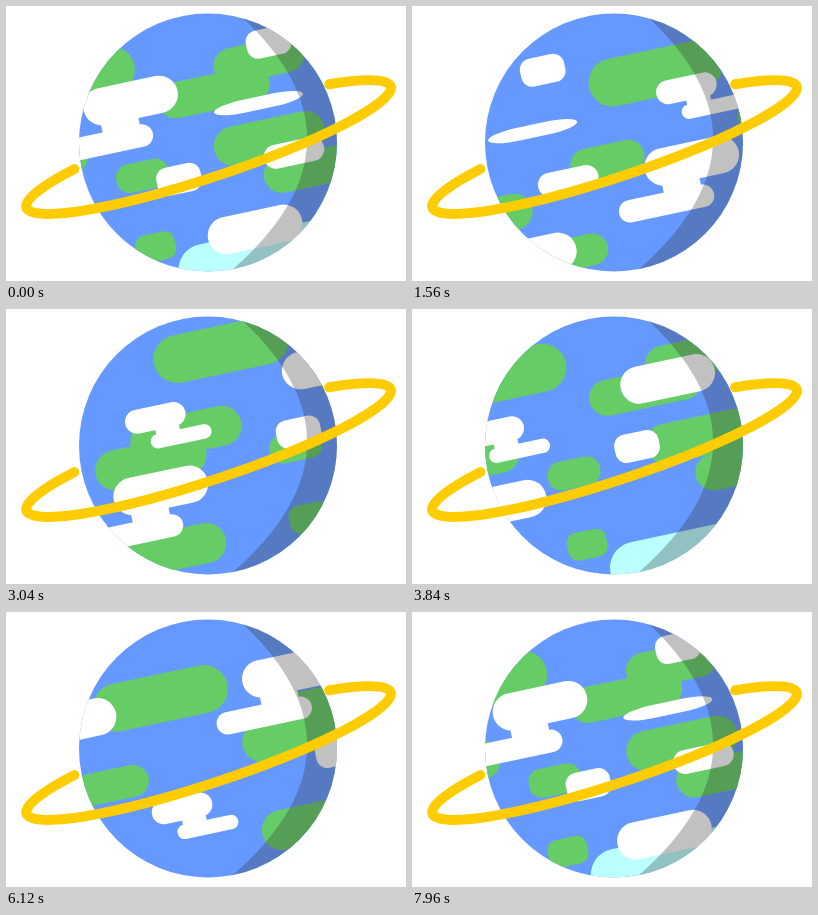
Animation, 400 px wide and 275 px high, one loop 8000 ms. Source, as an HTML page:

```html
<!DOCTYPE html>
<html lang="en">
<head>
<meta charset="utf-8">
<title>Spinning planet</title>
<style>
  html, body { margin: 0; width: 100%; height: 100%; overflow: hidden; background: #fff; }
  svg { display: block; }
</style>
</head>
<body>
<svg width="400" height="275" viewBox="0 0 400 275">
  <defs>
    <clipPath id="disc"><circle cx="202" cy="136.5" r="129"/></clipPath>
  </defs>
  <g clip-path="url(#disc)">
    <rect width="400" height="275" fill="#69f"/>
    <g transform="translate(202 136.5) rotate(-12)">
      <g id="land" fill="#6c6"></g>
      <g id="clouds" fill="#fff"></g>
    </g>
    <path d="M237 12Q370 137.5 227 263V275H340V0H237Z" fill="#333" opacity=".3"/>
  </g>
  <path transform="translate(202.5 141) rotate(-18.4)" d="M-134.3 -21.4A192 30 0 1 0 134.3 -21.4"
    fill="none" stroke="#fc0" stroke-width="10" stroke-linecap="round"/>
</svg>
<script>
const LOOP = 8000, STEP = 40;

const place = (shape, x, y, scale = "1") =>
  `<g transform="translate(${x} ${y}) scale(${scale})">${shape}</g>`;

// A centred bar: long ones become pills, short ones keep flat ends.
const bar = (w, h, r = Math.min(h / 2, w / 4)) =>
  `<rect x="${-w / 2}" y="${-h / 2}" width="${w}" height="${h}" rx="${r}"/>`;

const islet = bar(40, 28), island = bar(53, 29), shore = bar(75, 32);
const ridge = bar(92, 36), coast = bar(114, 36), plain = bar(113, 40), continent = bar(137, 48);
const land =
  place(islet, -73, 91.5) + place(island, -71, 19) +
  place(shore, 245, 16) + place(shore, 190, 100) +
  place(ridge, 67, -70) + place(coast, 16, -48) +
  place(plain, 61, 9) + place(coast, 104.5, 47) +
  place(plain, 438.5, 95) + place(plain, 437.5, 5) + place(plain, 478, -16.5) +
  place(continent, 310.5, -59) + place(continent, -124.5, -91) +
  `<g fill="#bff">${place(bar(174, 52), 31, 124)}</g>`;

const pill = bar(96, 37.5), puff = bar(45, 28.5);
const cloud = pill + place(bar(97, 22.5), -33.5, 36.7) + place(bar(38, 20, 0), -15, 21);
const cluster =
  place(cloud, -67, -57.2) + place(cloud, 216.8, -38, "-.64 .64") + place(puff, 80, -85.5);
const wisp = '<rect x="-45.5" y="-6.5" width="91" height="13" rx="30" ry="6.5"/>';
const clouds =
  cluster + place(cluster, 274, 91.2) +
  place(pill, 28, 94.8) + place(pill, 398, -54) + place(pill, 82, 28, ".64") +
  place(puff, -36, 30) + place(wisp, 57.5, -28);

// Repeats a strip so that it wraps without a seam, and returns its mover.
function strip(id, shapes, width, duration) {
  const group = document.getElementById(id);
  group.innerHTML = [-1, 0, 1].map(i => place(shapes, i * width, 0)).join("");
  return t => group.setAttribute("transform", `translate(${-width * (t % duration) / duration})`);
}

const moveLand = strip("land", land, 654, LOOP / 2);
const moveClouds = strip("clouds", clouds, 691, LOOP);

const start = performance.now();
function draw() {
  const t = Math.floor((performance.now() - start) % LOOP / STEP) * STEP;
  moveLand(t);
  moveClouds(t);
  requestAnimationFrame(draw);
}
draw();
</script>
</body>
</html>
```
